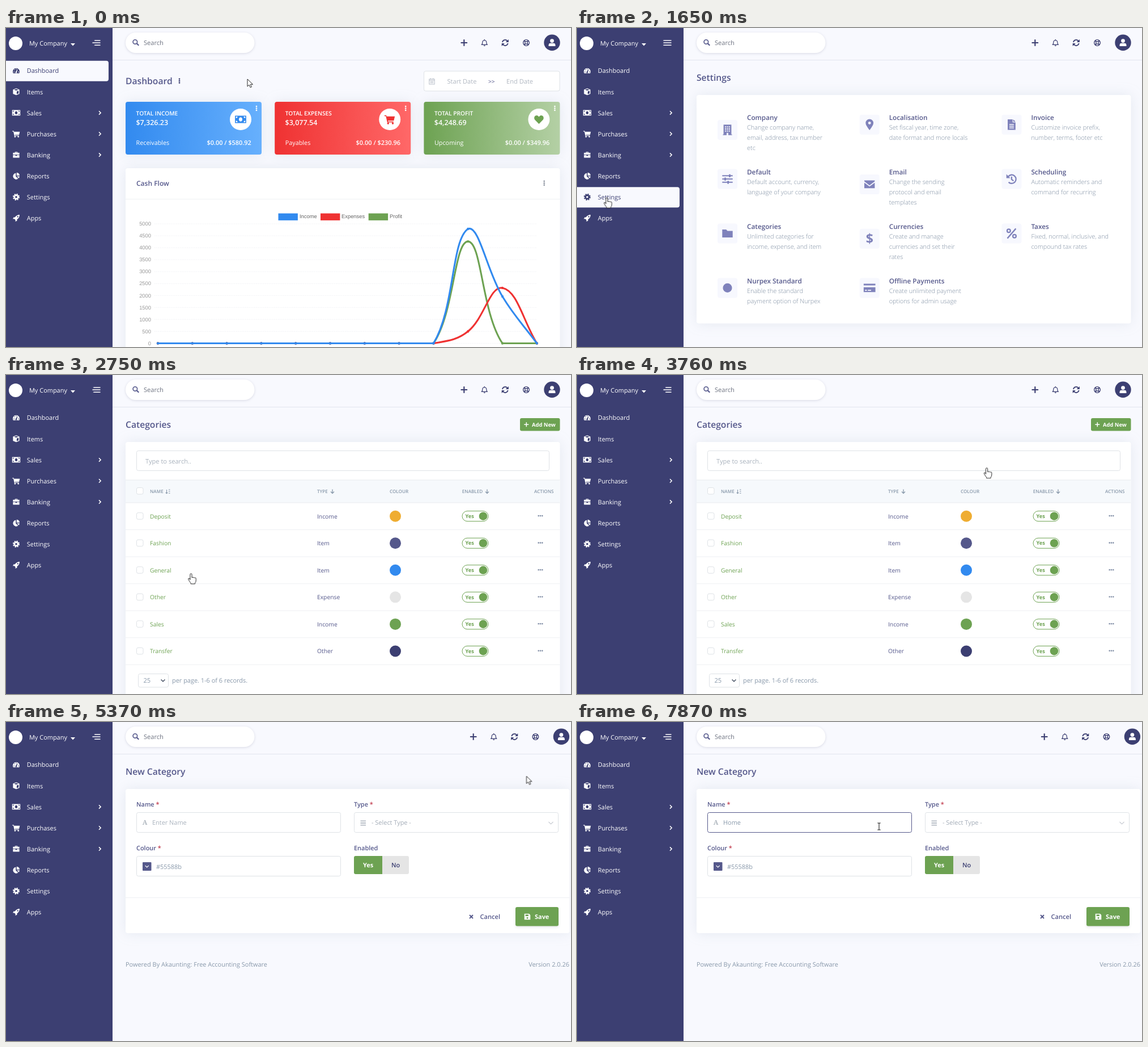
Write an HTML page that moves like this. It is 997 px wide and 562 px high and loops after 8 s.

```html
<!DOCTYPE html>
<html lang="en">
<head>
<meta charset="utf-8">
<title>Accounting: new category</title>
<style>
html, body { margin: 0; width: 100%; height: 100%; overflow: hidden; background: #f8f9fe; }
svg { display: block; width: 100%; height: 100%; font-family: "Open Sans", sans-serif; text-rendering: geometricPrecision; }
.icon { fill: currentColor; fill-rule: evenodd; }
.line { fill: none; stroke: currentColor; }
.card { fill: #fff; filter: drop-shadow(0 0 11px rgba(136, 152, 170, .17)); }
.field { fill: #fff; stroke: #dee2e6; }
.chart { font-family: "Liberation Sans", Arial, sans-serif; }

.pointer { animation: move 8s linear infinite; }
@keyframes move {
  0%, 1.6% { transform: translate(426px, 90px); animation-timing-function: ease-in-out; }
  12.5%, 20.625% { transform: translate(52.5px, 299px); animation-timing-function: ease-in-out; }
  26.5%, 38.75% { transform: translate(326.5px, 350px); animation-timing-function: cubic-bezier(.35, .1, .7, .75); }
  47% { transform: translate(722.5px, 164px); }
  48.875% { transform: translate(806px, 126px); animation-timing-function: cubic-bezier(.3, .55, .5, 1); }
  53.2%, 66.6% { transform: translate(920.5px, 95px); animation-timing-function: ease-in-out; }
  76.75% { transform: translate(541px, 184px); }
  78.75%, 100% { transform: translate(533px, 184px); }
}
.bar { transform-box: fill-box; transform-origin: right; animation: bar 8s linear infinite; }
@keyframes bar {
  0%, 20.62% { transform: scaleX(.74); }
  20.625%, 21.625% { transform: none; }
  23.5%, 32.495% { transform: scaleX(.74); }
  32.5%, 33.5% { transform: none; }
  35.375%, 58.37% { transform: scaleX(.74); }
  58.375%, 59.375% { transform: none; }
  61.25%, 100% { transform: scaleX(.74); }
}
.focus { animation: focus 8s linear infinite; }
@keyframes focus {
  0%, 77.4% { stroke: #dee2e6; }
  79.4%, 100% { stroke: #55588b; }
}
</style>
</head>
<body>
<svg id="stage" viewBox="0 0 997 562" preserveAspectRatio="none"></svg>
<script>
const LOOP = 8000, SETTINGS = 1650, LIST = 2600, FORM = 4670;
const NAVY = '#3c3f72', INDIGO = '#55588b', GREEN = '#6da252', BLUE = '#328aef', RED = '#ef3232';
const MUTED = '#8898aa', HINT = '#a9b2bd', RULE = '#e9ecef', LILAC = '#7f82bb';
let rules = '', count = 0;

// Wraps markup so that it is visible only in the given [from, to) spans.
function during(spans, body) {
  const name = 'on' + count++;
  const keys = { 0: 0 };
  for (const [a, b] of spans) {
    keys[a] = 1;
    if (b < LOOP) keys[b] = 0;
  }
  const steps = Object.entries(keys).map(([t, v]) => `${t / LOOP * 100}%{opacity:${v}}`);
  rules += `@keyframes ${name}{${steps.join('')}}`;
  return `<g style="animation:${name} 8s step-end infinite">${body}</g>`;
}

const text = (x, y, str, size = 10.95, color = INDIGO, weight = 400, anchor = 'start') =>
  `<text x="${x}" y="${y}" font-size="${size}" fill="${color}" font-weight="${weight}" text-anchor="${anchor}">${str}</text>`;
const rect = (x, y, w, h, r = 0, attrs = '') =>
  `<rect x="${x}" y="${y}" width="${w}" height="${h}" rx="${r}" ${attrs}/>`;
const fill = c => `fill="${c}"`;
const disc = (x, y, r, color) => `<circle cx="${x}" cy="${y}" r="${r}" fill="${color}"/>`;
const stroke = (d, w, color = 'currentColor', more = '') =>
  `<path d="${d}" fill="none" stroke="${color}" stroke-width="${w}" ${more}/>`;
const kebab = (x, y, color) => [-3.4, 0, 3.4].map(d => disc(x, y + d, 1.35, color)).join('');
const solid = d => `<path d="${d}"/>`;

// Icons are centred on the origin in a box of about 16 units.
const icons = {
  gauge: solid('M-8 2a8 8 0 0 1 16 0q0 2-1 4h-14q-1-2-1-4zM-1.6 3a1.8 1.8 0 1 0 3 0L3.5-3 2.5-3.4zM-6 2h2v1.6h-2zM4.5 2h2v1.6h-2zM-4.6-3h1.8v1.8h-1.8zM-1-5h1.8v1.8H-1z'),
  cube: solid('M0-8L7.5-5V5L0 8-7.5 5V-5zM-5.2-4.6L0-2.6 5.2-4.6 0-6.4zM1.2-.6V5.6L5.6 3.8V-2.4z'),
  cash: solid('M-9-6H9V6H-9zM0-3.4a2.8 3.4 0 1 0 .01 0zM-7.5-2v-2.5h2.5a2.5 2.5 0 0 1-2.5 2.5zM7.5-2v-2.5h-2.5a2.5 2.5 0 0 0 2.5 2.5zM-7.5 2v2.5h2.5a2.5 2.5 0 0 0-2.5-2.5zM7.5 2v2.5h-2.5a2.5 2.5 0 0 1 2.5-2.5z'),
  cart: solid('M-9-7h3.2l.5 2H8.5L6.8 2.2H-3l.3 1.4H6.2V5H-4.2L-6.6-5.4H-9z') + '<circle cx="-2.8" cy="6.6" r="1.7"/><circle cx="5" cy="6.6" r="1.7"/>',
  case: solid('M-3-5V-7.2h6V-5H7.5v4.2H-7.5V-5zM-1.6-5.9V-5h3.2v-.9zM-7.5 .2h5.7v2h3.6v-2h5.7V6.5H-7.5z'),
  pie: solid('M-1-7v8l5.6 5.4A7.5 7.5 0 1 1-1-7zM1-8a7.5 7.5 0 0 1 7 7H1zM1.6 .8H8a7.5 7.5 0 0 1-2.2 4.6z'),
  cog: '<circle class="line" r="4.2" stroke-width="3.6"/><circle class="line" r="6.8" stroke-width="2.6" stroke-dasharray="2.9 2.44"/>',
  rocket: solid('M8-8Q1-8-3-2h-3l-2 4 3.5-.3L-1.7 4.5-2 8 2 6V3Q8-1 8-8zM3.5-5a1.6 1.6 0 1 1-.01 0z'),
  search: '<circle class="line" cx="-1.6" cy="-1.6" r="5.2" stroke-width="2.3"/>' + stroke('M2.4 2.4L7.3 7.3', 3),
  plus: solid('M-1.5-8h3v6.5H8v3H1.5V8h-3V1.5H-8v-3h6.5z'),
  bell: stroke('M-6.3 4.5Q-4.6 2.5-4.6-1a4.6 4.8 0 0 1 9.2 0q0 3.5 1.7 5.5zM0-5.8V-8', 1.6) + solid('M-2 6h4a2 2 0 0 1-4 0z'),
  sync: stroke('M-6.2-1.2A6.2 6.2 0 0 1 5-3.8M6.2 1.2A6.2 6.2 0 0 1-5 3.8', 2.2) + solid('M7.8-7.8V-1.2H1.2zM-7.8 7.8V1.2h6.6z'),
  ring: '<circle class="line" r="7" stroke-width="1.8"/><circle class="line" r="3" stroke-width="1.6"/>' + stroke('M-5-5l2.6 2.6M5-5L2.4-2.4M-5 5l2.6-2.6M5 5L2.4 2.4', 2.6),
  user: '<circle cy="-3.6" r="4"/>' + solid('M-7 7.5V5.5Q-7 1.4-3 1.4h6q4 0 4 4.1v2z'),
  heart: solid('M0 7.5L-7 .4Q-9-3-6.5-5.6-3-8 0-4.4 3-8 6.5-5.6 9-3 7 .4z'),
  office: solid('M-6-8H6V7H7V8H-7V7H-6z' + [-5.5, -2.3, .9].map(y => [-3.8, -.9, 2].map(x => `M${x} ${y}h1.8v1.8h-1.8z`).join('')).join('') + 'M-1.3 4.5h2.6V8h-2.6z'),
  pin: solid('M0 8.5Q-6 1-6-2.5a6 6 0 0 1 12 0Q6 1 0 8.5zM0-4.6a2.1 2.1 0 1 0 .01 0z'),
  file: solid('M-6-8H1.5v4.5H6V8H-6zM2.5-8L6-4.5H2.5zM-3.5-.8v1.2h7v-1.2zM-3.5 1.8V3h7V1.8zM-3.5 4.4v1.2h7V4.4z'),
  sliders: stroke('M-8-5H8M-8 0H8M-8 5H8', 1.7) + stroke('M3.5-7.2v4.4M-3.5-2.2v4.4M1 2.8v4.4', 2.4),
  mail: solid('M-8-6H8v1.6L0 1.6-8-4.4zM-8-2.6L0 3.4 8-2.6V6H-8z'),
  history: stroke('M-5-4A6.6 6.6 0 1 1-4.6 4.8M0-3.8V.6l3 2.2', 2) + solid('M-8-7.4V-1.4h6z'),
  folder: solid('M-8-6h6l2 2H8V6H-8z'),
  dollar: '<text y="7" font-size="20" font-weight="700" text-anchor="middle">$</text>',
  percent: '<circle class="line" cx="-4.4" cy="-4.2" r="2.5" stroke-width="2"/><circle class="line" cx="4.4" cy="4.2" r="2.5" stroke-width="2"/>' + stroke('M6.5-7.5L-6.5 7.5', 2),
  blob: '<circle r="7"/>',
  credit: solid('M-9-6.5H9V-3.8H-9zM-9-1H9V6.5H-9zM-7 3v1.5h3V3zM-2.6 3v1.5h5V3z'),
  disk: solid('M-7-7H4l3 3V7H-7zM-4.5-5v3.5h7V-5zM0 1a2 2 0 1 0 .01 0z'),
  calendar: '<rect class="line" x="-6.5" y="-5.5" width="13" height="12.5" stroke-width="1.3"/>' + stroke('M-6.5-2.5h13M-3-8v3M3-8v3M-4 .5h8M-4 3.5h8', 1.3)
};
const icon = (name, x, y, scale, color) =>
  `<g class="icon" transform="translate(${x} ${y}) scale(${scale})" color="${color}">${icons[name]}</g>`;

const menu = [['gauge', 'Dashboard'], ['cube', 'Items'], ['cash', 'Sales'], ['cart', 'Purchases'],
  ['case', 'Banking'], ['pie', 'Reports'], ['cog', 'Settings'], ['rocket', 'Apps']];

function menuItem(i, color) {
  const y = 75.4 + 37.1 * i;
  const arrow = i > 1 && i < 5 ? stroke(`M164 ${y - 3.4}l3.2 3.2-3.2 3.2`, 1.5, color) : '';
  return icon(menu[i][0], 18, y - .2, i === 2 ? .8 : .75, color) + text(36.8, y + 4, menu[i][1], 10.95, color) + arrow;
}
const activeItem = i => rect(-6, 57.7 + 37.1 * i, 187, 36, 4, fill('#f8f9fe')) + menuItem(i, NAVY);

function sidebar() {
  const bars = [21.2, 25.3, 29.4].map((y, i) =>
    rect(152.4, y, 14.2, 1.5, .5, `fill="#fff" class="${i === 1 ? '' : 'bar'}"`)).join('');
  return rect(0, 0, 188, 562, 0, fill(NAVY)) + disc(17, 27, 12, '#fff') +
    text(41, 31.2, 'My Company', 10.95, '#fff') + '<path d="M114 27h8l-4 4.4z" fill="#fff"/>' + bars +
    menu.map((_, i) => menuItem(i, '#fff')).join('');
}

function topBar() {
  return rect(188, 56, 809, 1, 0, fill('#e2e5ee')) +
    rect(211, 8, 227.5, 36, 18, 'fill="#fff" style="filter:drop-shadow(0 1px 2px rgba(50,50,93,.16))"') +
    icon('search', 229, 25.6, .72, INDIGO) + text(243, 30.2, 'Search', 11.1, '#6f7482');
}
function tools(dx) {
  return `<g transform="translate(${dx})">` + icon('plus', 808.3, 26, .72, NAVY) + icon('bell', 844.3, 26, .76, NAVY) +
    icon('sync', 880.8, 26, .78, NAVY) + icon('ring', 918, 26, .76, NAVY) +
    disc(963.5, 25.8, 14.2, NAVY) + icon('user', 963.5, 25.6, .85, '#fff') + '</g>';
}

function summary(i, color, light, title, total, label, value, sign) {
  const x = 211 + 263.2 * i;
  return `<linearGradient id="g${i}"><stop stop-color="${color}"/><stop offset="1" stop-color="${light}"/></linearGradient>` +
    rect(x, 130, 240, 93, 4, `fill="url(#g${i})" style="filter:drop-shadow(0 0 11px rgba(136,152,170,.17))"`) +
    text(x + 18.6, 153.6, title, 10.2, '#fff', 600) + text(x + 18.4, 171.4, total, 12.5, '#fff', 600) +
    text(x + 18.6, 206, label, 10.8, '#fff') + text(x + 221.8, 206, value, 10.95, '#fff', 600, 'end') +
    disc(x + 203, 161, 19, '#fff') + icon(sign, x + 203, 161, sign === 'cash' ? 1.1 : 1.05, color) + kebab(x + 231, 141.5, '#fff');
}

// Cardinal spline with tension .4, control points kept inside the plot.
function curve(tail, color) {
  const base = 555.5, top = 345;
  const values = [...Array(9).fill(0), ...tail];
  const pts = values.map((v, i) => [268 + 60.8 * i, base - v * .04206]);
  const clamp = y => Math.min(base, Math.max(top, y));
  const ctrl = pts.map((p, i) => {
    const a = pts[i - 1] || p, b = pts[i + 1] || p;
    const da = Math.hypot(p[0] - a[0], p[1] - a[1]), db = Math.hypot(b[0] - p[0], b[1] - p[1]);
    const at = k => [p[0] + k * (b[0] - a[0]), clamp(p[1] + k * (b[1] - a[1]))];
    return [at(-.4 * da / (da + db)), at(.4 * db / (da + db))];
  });
  let d = 'M' + pts[0];
  for (let i = 1; i < pts.length; i++) d += `C${ctrl[i - 1][1]} ${ctrl[i][0]} ${pts[i]}`;
  return stroke(d, 3.1, color) + pts.map(p => disc(p[0], p[1], 2.2, color)).join('');
}

function dashboard() {
  let s = activeItem(0) + text(211, 98.6, 'Dashboard', 15.65, INDIGO, 600) + kebab(306, 93.2, NAVY) +
    rect(737.5, 76, 239.5, 35, 3, 'class="field"') + icon('calendar', 751.5, 94, .72, '#b4bbc6') +
    text(778.5, 98, 'Start Date', 11.1, '#b1b8c2') + text(851, 97.6, '&gt;&gt;', 10.2, INDIGO) + text(883, 98, 'End Date', 11.1, '#b1b8c2') +
    summary(0, BLUE, '#67b0fd', 'TOTAL INCOME', '$7,326.23', 'Receivables', '$0.00 / $580.92', 'cash') +
    summary(1, RED, '#ff6868', 'TOTAL EXPENSES', '$3,077.54', 'Payables', '$0.00 / $230.96', 'cart') +
    summary(2, GREEN, '#b4d0a5', 'TOTAL PROFIT', '$4,248.69', 'Upcoming', '$0.00 / $349.96', 'heart') +
    rect(211, 247, 766.5, 400, 4, 'class="card"') + rect(211, 301, 766.5, 1, 0, fill('#eff1f4')) +
    text(230, 278, 'Cash Flow', 12, INDIGO, 600) + kebab(949.7, 273.3, '#8d94a0') + '<g class="chart">';
  [['Income', BLUE, 480.5, 518], ['Expenses', RED, 555, 592], ['Profit', GREEN, 639.7, 677]].forEach(([label, color, x, tx]) => {
    s += rect(x, 326.6, 34.4, 12.3, 0, fill(color)) + text(tx, 335.2, label, 9.39, '#666');
  });
  for (let i = 0; i <= 10; i++) {
    const y = 345 + 21.05 * i;
    s += text(256, y + 3.2, 5000 - 500 * i, 9.39, '#999', 400, 'end') + stroke(`M262 ${y}H937`, .8, '#eceef2', 'stroke-dasharray="1.6 1.6"');
  }
  return s + '</g>' + curve([4265, 0, 0], GREEN) + curve([500, 2320, 0], RED) + curve([4790, 1960, 0], BLUE);
}

const options = [
  ['office', 'Company', 'Change company name,', 'email, address, tax number', 'etc'],
  ['pin', 'Localisation', 'Set fiscal year, time zone,', 'date format and more locals'],
  ['file', 'Invoice', 'Customize invoice prefix,', 'number, terms, footer etc'],
  ['sliders', 'Default', 'Default account, currency,', 'language of your company'],
  ['mail', 'Email', 'Change the sending', 'protocol and email', 'templates'],
  ['history', 'Scheduling', 'Automatic reminders and', 'command for recurring'],
  ['folder', 'Categories', 'Unlimited categories for', 'income, expense, and item'],
  ['dollar', 'Currencies', 'Create and manage', 'currencies and set their', 'rates'],
  ['percent', 'Taxes', 'Fixed, normal, inclusive, and', 'compound tax rates'],
  ['blob', 'Nurpex Standard', 'Enable the standard', 'payment option of Nurpex'],
  ['credit', 'Offline Payments', 'Create unlimited payment', 'options for admin usage']
];
function settings() {
  return activeItem(6) + text(211, 92.6, 'Settings', 15.65, INDIGO, 600) + rect(211, 118, 766.5, 402.5, 4, 'class="card"') +
    options.map(([sign, title, ...lines], i) => {
      const x = 248 + 250.7 * (i % 3), y = 158 + 95.9 * Math.floor(i / 3), mid = y + (lines.length > 2 ? 21.5 : 12.2);
      return rect(x, mid - 17.5, 35, 35, 4, fill('#f7f8fe')) + icon(sign, x + 17.5, mid, 1.15, LILAC) +
        text(x + 52, y + 4.2, title, 11.75, INDIGO, 600) +
        lines.map((line, n) => text(x + 52, y + 21.4 + 17.8 * n, line, 10.95, '#7d8da1', 300)).join('');
    }).join('');
}

const rows = [['Deposit', 'Income', '#efad32'], ['Fashion', 'Item', INDIGO], ['General', 'Item', BLUE],
  ['Other', 'Expense', '#e5e5e5'], ['Sales', 'Income', GREEN], ['Transfer', 'Other', NAVY]];
const check = y => rect(230.5, y - 6, 11.5, 11.5, 2.5, 'class="field"');
const down = x => stroke(`M${x} 201.5v7M${x - 3} 205.5l3 3 3-3`, 1.3, MUTED);

function list() {
  const head = (x, label) => text(x, 208, label, 8.1, MUTED, 600);
  let s = text(211, 92.6, 'Categories', 15.65, INDIGO, 600) + rect(907, 76, 70.5, 22.5, 3, fill(GREEN)) +
    icon('plus', 918.3, 87.2, .5, '#fff') + text(928, 90.6, 'Add New', 9.4, '#fff', 700) +
    rect(211, 118, 766.5, 500, 4, 'class="card"') + rect(230.5, 133.5, 728, 35, 3, 'class="field"') +
    text(246, 156, 'Type to search..', 11.1, HINT) +
    rect(211, 185, 766.5, 40, 0, fill('#f6f9fc')) + rect(211, 184.5, 766.5, 1, 0, fill(RULE)) + rect(211, 224.5, 766.5, 1, 0, fill(RULE)) +
    check(204.5) + head(254, 'NAME') + stroke('M283.5 202v7M281.7 207l1.8 1.8 1.8-1.8M287 202h2.5M287 205h2.5M287 208.3h2.5', 1.1, MUTED) +
    head(549, 'TYPE') + down(576) + head(677, 'COLOUR') + head(804.8, 'ENABLED') + down(849) + head(932, 'ACTIONS');
  rows.forEach(([name, type, color], i) => {
    const y = 248.7 + 47.55 * i;
    s += check(y) + text(254, y + 3.9, name, 10.3, GREEN) + text(549, y + 3.9, type, 10.3, INDIGO) + disc(687, y, 10, color) +
      rect(805, y - 9, 46, 18, 9, `fill="#fff" stroke="${GREEN}"`) + text(810.5, y + 3.2, 'Yes', 9.2, GREEN, 700) + disc(842, y, 7.3, GREEN) +
      [-3.3, 0, 3.3].map(d => disc(943 + d, y - .6, 1.3, '#8490a8')).join('') + rect(211, y + 23.4, 766.5, 1, 0, fill('#eef0f3'));
  });
  return s;
}
const pager = () => rect(233.5, 526.5, 53, 23.5, 3, 'class="field"') + text(242.5, 542.4, '25', 11.1, MUTED) +
  stroke('M273.5 536.5l3.5 3.3 3.5-3.3', 1.6, '#555f70') + text(293, 542.4, 'per page. 1-6 of 6 records.', 10.95, MUTED);

function form() {
  const label = (x, y, name, star) => text(x, y, name + (star ? ' <tspan fill="#c0394b">*</tspan>' : ''), 10.95, INDIGO, 600);
  const field = (x, y, cls = '') => rect(x + .5, y, 360, 35, 3, `class="field ${cls}"`);
  const caret = x => rect(x, 171, 1, 13, 0, fill('#555'));
  let s = text(211, 92.6, 'New Category', 15.65, INDIGO, 600) + rect(211, 118, 783.5, 254, 4, 'class="card"') +
    label(230, 148.8, 'Name', true) + label(614, 148.8, 'Type', true) + label(230, 226, 'Colour', true) + label(614, 226, 'Enabled') +
    field(230, 159.5, 'focus') + field(614, 159.5) + field(230, 236.5) +
    '<text x="245" y="181.2" font-size="11.5" font-weight="700" fill="#adb5bd" text-anchor="middle" font-family="Noto Serif, serif">A</text>' +
    stroke('M625.5 174.4h9.5M625.5 178h9.5M625.5 181.6h9.5', 1.4, '#9ba4b0') + text(645, 181.3, '- Select Type -', 10.95, '#a3acb7') +
    stroke('M957.5 175.8l4 4 4-4', 1.1, '#c0c4cc') +
    rect(241, 247, 15.5, 15, 1, fill(INDIGO)) + stroke('M245.7 253l3 3 3-3', 1.1, '#fff') + text(265, 258.6, '#55588b', 10.95, MUTED) +
    rect(614, 236, 50, 32, 3, fill(GREEN)) + rect(661, 236, 50, 32, 3, fill('#e5e5e5')) + rect(658, 236, 6, 32, 0, fill(GREEN)) +
    text(639, 256.2, 'Yes', 10.95, '#fff', 700, 'middle') + text(687.6, 256.2, 'No', 10.95, NAVY, 600, 'middle') +
    rect(211, 309, 783.5, 1, 0, fill('#eef0f3')) + stroke('M818 340l6 6M824 340l-6 6', 1.9, INDIGO) +
    text(836.5, 346.8, 'Cancel', 11.1, INDIGO, 600) +
    rect(899, 326, 76, 33.5, 3, `fill="${GREEN}" style="filter:drop-shadow(0 2px 2px rgba(50,50,93,.12))"`) +
    icon('disk', 920, 343, .75, '#fff') + text(933, 346.8, 'Save', 10.95, '#fff', 700) +
    text(211, 431, 'Powered By Akaunting: Free Accounting Software', 10.95, MUTED) + text(994, 431, 'Version 2.0.26', 10.95, MUTED, 400, 'end');
  s += during([[0, 6680]], text(258, 181.3, 'Enter Name', 10.95, HINT)) + during([[6300, 6680]], caret(258));
  const typed = [[6680, 'H', 266], [7000, 'Ho', 272.6], [7150, 'Hom', 282.8], [7320, 'Home', 288.4]];
  typed.forEach(([from, str, x], i) => {
    const to = i < 3 ? typed[i + 1][0] : LOOP;
    s += during([[from, to]], text(258, 181.3, str, 10.95, MUTED)) + during([[from, Math.min(to, 7870)]], caret(x));
  });
  return s;
}

function pointer() {
  const shape = d => `<path d="${d}" fill="#fff" stroke="#111" stroke-width=".9" stroke-linejoin="round"/>`;
  return '<g class="pointer">' +
    during([[1020, 1250], [2360, 2600], [4450, FORM], [6220, 6370]], '<circle r="11.5" fill="#777" fill-opacity=".18"/>') +
    during([[0, 640], [1870, 2000], [FORM, 5930]], shape('M0 0V13l3-2.9 2.2 4.7 2.2-1-2.1-4.5h4.2z')) +
    during([[640, 1870], [2000, FORM]], shape('M-1.6 10.5V1.6a1.6 1.6 0 0 1 3.2 0V7q1.2-1.4 2.6 0 1.4-1 2.4.4 2.2-.6 2.2 1.2v3.4q0 2.5-1.8 4.6V18h-7.4v-1.4q-2-2.4-3.8-5.6-1.4-2.6.2-2.9 1.2-.2 2.6 2.4z')) +
    during([[5930, LOOP]], stroke('M-2.8-6h2.2l.6.6.6-.6h2.2M0-5.4V5.4M-2.8 6h2.2l.6-.6.6.6h2.2', 1.1, '#222')) + '</g>';
}

const scene = rect(0, 0, 997, 562, 0, fill('#f8f9fe')) + topBar() +
  during([[0, FORM]], tools(0)) + during([[FORM, LOOP]], tools(16.4)) + sidebar() +
  during([[0, SETTINGS]], dashboard()) + during([[SETTINGS, LIST]], settings()) +
  during([[LIST, FORM]], list()) + during([[LIST + 150, FORM]], pager()) +
  during([[FORM, LOOP]], form()) + pointer();

const sheet = document.createElement('style');
sheet.textContent = rules;
document.head.append(sheet);
document.getElementById('stage').innerHTML = scene;
</script>
</body>
</html>
```
